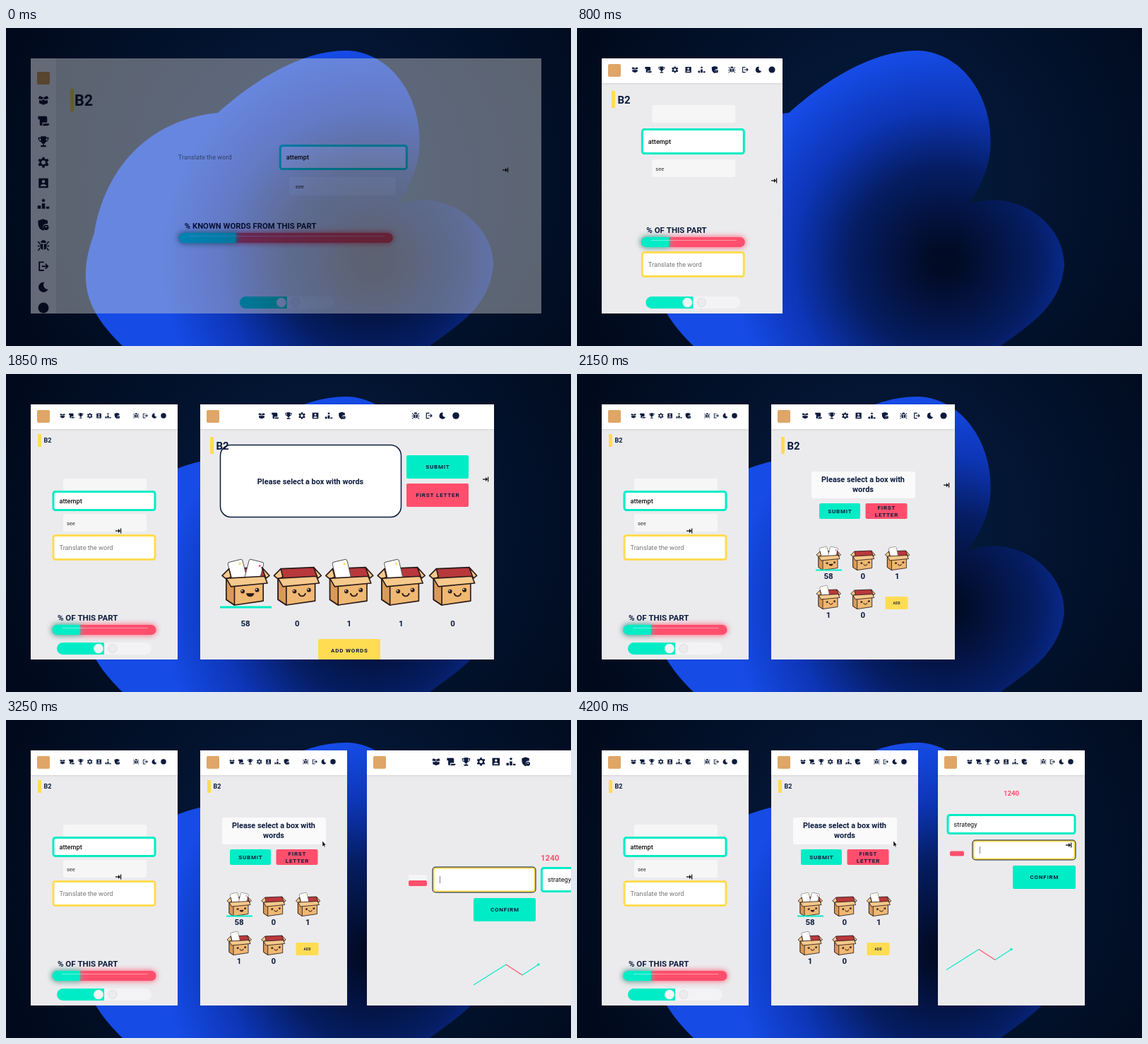
Write an HTML page with a canvas that moves like this. It is 800 px wide and 450 px high and loops after 4.25 s.

```html
<!DOCTYPE html>
<html lang="en">
<head>
<meta charset="utf-8">
<title>Responsive windows</title>
<style>
html, body { margin: 0; width: 100%; height: 100%; overflow: hidden; background: #010c22; }
canvas { display: block; }
</style>
</head>
<body>
<canvas width="800" height="450"></canvas>
<script>
// Each window is painted on the layer (g), then laid onto the stage
const stage = document.querySelector('canvas').getContext('2d');
const layer = new OffscreenCanvas(800, 450);
const g = layer.getContext('2d');
const LOOP = 4250, STEP = 50, TOP = 43, BOTTOM = 404, SIDEBAR = 36;
const NAVY = '#0c1b3d', TEAL = '#00ecc6', RED = '#ff4f6d', YELLOW = '#ffdc52', PAGE = '#ebebed';

// Piecewise linear value through [position, value] points
function along(p, points) {
  if (p <= points[0][0]) return points[0][1];
  for (let i = 1; i < points.length; i++) {
    const [a, u] = points[i - 1], [b, v] = points[i];
    if (p <= b) return u + (v - u) * (p - a) / (b - a);
  }
  return points[points.length - 1][1];
}

function text(s, x, y, size, { weight = 700, color = NAVY, align = 'left', spacing = 0 } = {}) {
  g.font = `${weight} ${size}px Roboto, Arial, sans-serif`;
  g.letterSpacing = spacing + 'px';
  g.textAlign = align;
  g.textBaseline = 'alphabetic';
  g.fillStyle = color;
  g.fillText(s, x + (align === 'center' ? spacing / 2 : 0), y + size * .36);
}

function rect(x, y, w, h, r, fill, line, width = 1.5) {
  g.beginPath();
  g.roundRect(x, y, w, h, r);
  if (fill) { g.fillStyle = fill; g.fill(); }
  if (line) { g.strokeStyle = line; g.lineWidth = width; g.stroke(); }
}

function dot(x, y, r, fill, line) {
  g.beginPath();
  g.arc(x, y, r, 0, 7);
  g.fillStyle = fill;
  g.fill();
  if (line) { g.strokeStyle = line; g.lineWidth = 1; g.stroke(); }
}

function poly(points, fill, line, width = 1.7) {
  g.beginPath();
  points.forEach(([x, y]) => g.lineTo(x, y));
  if (fill) { g.closePath(); g.fillStyle = fill; g.fill(); }
  if (line) { g.strokeStyle = line; g.lineWidth = width; g.lineJoin = 'round'; g.stroke(); }
}

function glow(color, blur, draw) {
  g.save();
  g.shadowColor = color;
  g.shadowBlur = blur;
  draw();
  g.restore();
}

function field(x, y, w, h, color, s, style) {
  rect(x + 1.5, y + 1.5, w - 3, h - 3, 3, '#fff', color, 3);
  text(s, x + 10, y + h / 2, 9.2, style);
}

function focusField(x, y, w, h) {
  rect(x - .5, y - .5, w + 1, h + 1, 5, NAVY);
  rect(x + 1.5, y + 1.5, w - 3, h - 3, 3, '#fff', YELLOW, 2);
  rect(x + 10, y + h / 2 - 5, .8, 10, 0, '#666');
}

function button(s, x, y, w, h, color) {
  rect(x, y, w, h, 2, color);
  const lines = s.split('\n');
  lines.forEach((line, i) => text(line, x + w / 2, y + h / 2 + (i - (lines.length - 1) / 2) * 9.5, 8,
    { weight: 600, align: 'center', spacing: .8 }));
}

const icons = [
  'M2 9l3-5 7 3 7-3 3 5-7 2-3-3-3 3zM4 12l5 1 3-3 3 3 5-1v6l-8 3-8-3z',
  'M2 3h14q3 0 3 3v9h-9v3q0 3-3 3-2 0-2-3V9H2zM12 17h11q0 4-4 4H9q3-1 3-4z',
  'M7 2h10v2h5q0 8-6 9-1 3-3 3v3h4v3H7v-3h4v-3q-2 0-3-3-6-1-6-9h5zM4 6q0 4 3 5V6zM17 6v5q3-1 3-5z',
  'M10 2h4l.5 3 2.5 1 3-1 2 3.5-2.5 2v3l2.5 2-2 3.5-3-1-2.5 1-.5 3h-4l-.5-3-2.5-1-3 1-2-3.5 2.5-2v-3l-2.5-2 2-3.5 3 1 2.5-1zM12 8a4 4 0 100 8 4 4 0 000-8z',
  'M3 3h18v18H3zM12 6a3 3 0 100 6 3 3 0 000-6zM6 18h12q-1-4-6-4t-6 4z',
  'M1 15h6v6H1zM9 11h6v10H9zM17 17h6v4h-6zM12 1l1.2 2.6 2.8.3-2 2 .5 2.8-2.5-1.4-2.5 1.4.5-2.8-2-2 2.8-.3z',
  'M11 1l9 3v6h-3a6 6 0 00-3 11l-3 2q-9-4-9-13V4zM17 12a5 5 0 100 10 5 5 0 000-10zM17 14a1.5 1.5 0 100 3 1.5 1.5 0 000-3z',
  'M7 7a5 5 0 0110 0zM6 9h5v11a6 6 0 01-5-6zM13 9h5v5a6 6 0 01-5 6zM1 12h4v2H1zM19 12h4v2h-4zM3 4l3 4-1 2-4-5zM21 4l-3 4 1 2 4-5zM5 16l1 2-3 4-2-1zM19 16l-1 2 3 4 2-1z',
  'M3 3h10v2.5H5.5v13H13V21H3zM9 10.7h8.5L15 8l1.6-1.6L22 12l-5.4 5.6L15 16l2.5-2.7H9z',
  'M14 3a9.5 9.5 0 107 13 8 8 0 01-7-13z',
  'M12 2a10 10 0 100 20 10 10 0 000-20z'
].map(d => new Path2D(d));

function icon(i, x, y, size) {
  g.save();
  g.translate(x - size / 2, y - size / 2);
  g.scale(size / 24, size / 24);
  g.fillStyle = NAVY;
  g.fill(icons[i], 'evenodd');
  g.restore();
}

function nav(left, w, side) {
  if (side) {
    rect(left, TOP, SIDEBAR, BOTTOM - TOP, 0, '#fff');
    icons.forEach((_, i) => icon(i, left + 18, 102 + i * 29.4, 18));
  } else {
    glow('rgba(0,0,0,.2)', 3, () => rect(left, TOP, w, 35, 0, '#fff'));
    const size = along(w, [[208, 9], [256, 11], [416, 11.5], [502, 14]]);
    const gap = along(w, [[208, 12.9], [256, 18.9], [416, 19], [502, 21.2]]);
    const first = along(w, [[208, 45], [256, 47], [416, 87], [502, 98], [570, 98], [650, 44]]);
    const last = along(w, [[208, 188], [256, 241], [416, 362], [502, 448], [570, 500], [650, 252]]);
    icons.forEach((_, i) => icon(i, left + (i < 7 ? first + i * gap : last - (10 - i) * gap), 59, size));
  }
  rect(left + 9, side ? 62 : 51, 18, 18, 2, '#dfa667');
}

function heading(left, w, side) {
  if (side) {
    rect(left + 56, 86, 5, 32, 0, YELLOW);
    text('B2', left + 62, 102, 21.5);
  } else if (w < 230) {
    rect(left + 10, 85, 5, 18, 0, YELLOW);
    text('B2', left + 18.5, 94, 9);
  } else {
    rect(left + 14, 89, 5, 24, 0, YELLOW);
    text('B2', left + 22.5, 101.5, 15);
  }
}

function progress(x, y, w) {
  const part = w * .267;
  glow(RED, 9, () => rect(x, y, w, 14, 7, RED));
  glow(TEAL, 9, () => rect(x, y, part, 14, [7, 0, 0, 7], TEAL));
  rect(x + 14, y + 4, w - 26, .7, 0, 'rgba(255,255,255,.55)');
}

function toggle(c) {
  rect(c - 67, 380, 134, 17, 8.5, '#f3f3f5');
  rect(c - 67, 380, 67, 17, [8.5, 0, 0, 8.5], TEAL);
  dot(c - 8, 388.5, 6.5, '#f4f4f4', '#d8f5ee');
  dot(c + 12, 388.5, 6, '#ececee', '#dcdcde');
}

function wordPage(left, w, side) {
  const narrow = w < 230, c = left + w / 2 + (narrow ? 0 : 1.3);
  const hint = { weight: 400, color: '#777' }, word = { weight: 500, color: '#111' };
  const small = { weight: 400, color: '#333' };
  const option = (x, y, s) => {
    rect(x, y, 118, 25, 3, '#f6f6f7');
    text(s, x + 5, y + 13, 7.5, small);
  };
  if (w > 400) {
    text('Translate the word', c - 154, 183, 9.2, hint);
    rect(c + 3, 211, 151, 26, 3, '#f6f6f7');
    text('see', c + 12, 224, 7.5, small);
    field(c - 11, 165, 182, 36, TEAL, 'attempt', word);
    text('% KNOWN WORDS FROM THIS PART', c - 145, 280, 11.3);
    progress(c - 153, 290, 303);
  } else {
    const [top, mid, low, ask, title, bar] = narrow
      ? [148, 165, 198, 227, 345, 355] : [109, 142, 186, 316, 286, 296];
    option(c - 58, top, '');
    option(c - 58, low, 'see');
    field(c - 73.5, mid, 147, narrow ? 29 : 37, TEAL, 'attempt', word);
    text('% OF THIS PART', c - 66, title, 11.5);
    progress(c - 73.5, bar, 147);
    field(c - 73.5, ask, 147, 37, YELLOW, 'Translate the word', hint);
  }
  toggle(c);
  heading(left, w, side);
}

function carton(x, y, scale, cards, laughing) {
  const ink = '#2a1a18', tan = '#efb873', pale = '#f6c98c';
  g.save();
  g.translate(x, y);
  g.scale(scale, scale);
  poly([[-24, -20], [24, -22], [31, -7], [-27, -4]], '#b8383c', ink);
  for (let i = 0; i < cards; i++) {
    g.save();
    g.translate(cards > 1 ? -12 + i * 25 : -11, -18);
    g.rotate(cards > 1 ? -.25 + i * .5 : -.22);
    rect(-11, -14, 22, 28, 3, '#fff', '#555', 1);
    dot(6, -8, 1.6, i ? RED : YELLOW);
    g.restore();
  }
  poly([[-28, -5], [-17, 0], [26, -2], [26, 27], [-16, 33], [-28, 25]], tan, ink);
  poly([[-28, -5], [-16, 1], [-16, 33], [-28, 25]], '#d99a59', ink);
  poly([[-24, -20], [-34, -10], [-28, -5], [-21, -8]], pale, ink);
  poly([[-28, -6], [28, -9], [32, 1], [-21, 6]], pale, ink);
  poly([[24, -22], [35, -10], [30, -6]], pale, ink);
  dot(-4, 13, 3, ink);
  dot(17, 11, 3, ink);
  dot(-5, 12, 1, '#fff');
  dot(16, 10, 1, '#fff');
  g.beginPath();
  g.arc(7, 15, laughing ? 6 : 5, .1, 3);
  g.strokeStyle = g.fillStyle = ink;
  g.lineWidth = 2;
  laughing ? g.fill() : g.stroke();
  g.restore();
}

function verticalBar(x, label) {
  glow(RED, 9, () => rect(x, 152, 14, 186, 7, RED));
  rect(x + 5, 164, .7, 160, 0, 'rgba(255,255,255,.55)');
  g.save();
  g.translate(x + 24, 270);
  g.rotate(Math.PI / 2);
  text(label, 0, 0, 10.7, { align: 'center' });
  g.restore();
}

function boxPage(left, w, side) {
  const c = left + w / 2, mid = { align: 'center' };
  const counts = [58, 0, 1, 1, 0], cards = [2, 0, 1, 1, 0];
  if (w > 300) {
    const bars = w > 600, x = c - (bars ? 237 : 180);
    rect(x + .5, 100.5, 256, 102, 15, '#fff', NAVY);
    text('Please select a box with words', x + 128, 152, 10.9, mid);
    button('SUBMIT', x + 264, 115, 88, 33, TEAL);
    button('FIRST LETTER', x + 264, 155, 88, 33, RED);
    counts.forEach((n, i) => {
      const bx = x + 36 + i * 73.4;
      carton(bx, 295, .97, cards[i], !i);
      text(n, bx, 353, 11.5, mid);
    });
    rect(x, 328.5, 73, 3, 0, TEAL);
    button('ADD WORDS', x + 139, 375, 88, 33, YELLOW);
    if (bars) {
      verticalBar(x + 385, 'DAILY PROGRESS');
      verticalBar(x + 430, 'TOTAL PROGRESS');
    }
  } else {
    rect(c - 73, 138, 147, 38, 3, '#fafafb');
    text('Please select a box with', c, 149.5, 10.9, mid);
    text('words', c, 163.5, 10.9, mid);
    button('SUBMIT', c - 62, 183, 58, 22, TEAL);
    button('FIRST\nLETTER', c + 3.5, 183, 59, 22, RED);
    counts.forEach((n, i) => {
      const bx = c - 49 + i % 3 * 48.7, y = i < 3 ? 261 : 316;
      carton(bx, y, .5, cards[i], !i);
      text(n, bx, y + 24.5, 11.5, mid);
    });
    rect(c - 67, 276.5, 37, 2, 0, TEAL);
    rect(c + 31.5, 315, 32, 18, 2, YELLOW);
    text('ADD', c + 47.5, 324, 4.5, { align: 'center', spacing: .5 });
  }
  heading(left, w, side);
}

function chart(x, y) {
  const points = [[x, y], [x + 46, y - 29], [x + 69, y - 14], [x + 92, y - 29]];
  [TEAL, RED, TEAL].forEach((color, i) => poly(points.slice(i, i + 2), null, color, 1.1));
  dot(x + 92, y - 29, 1.7, TEAL);
}

function scorePage(left, w, side) {
  const c = left + (w + (side ? SIDEBAR : 0)) / 2, word = { weight: 400, color: '#111' };
  if (w > 300) {
    rect(c - 192, 219, 26, 16, 2, '#f5f5f6');
    rect(c - 192, side ? 224 : 227, 26, 8, 2, RED);
    focusField(c - 158, 208, 146, 36);
    text('1240', c - 5, 195, 11.5, { color: RED });
    field(c - 5, 208, 146, 36, TEAL, 'strategy', word);
    button('CONFIRM', c - 100, 252, 88, 33, TEAL);
    chart(c - 100, 375);
  } else {
    text('1240', c, 104, 9.7, { color: RED, align: 'center' });
    field(c - 91.5, 133, 183, 29, TEAL, 'strategy', word);
    rect(c - 87, 185.5, 20, 7, 2, RED);
    focusField(c - 55, 170, 146, 28);
    button('CONFIRM', c + 2, 206, 89, 33, TEAL);
    chart(c - 92, 353.5);
  }
}

function resizeCursor(x, y) {
  poly([[x - 4, y], [x + 2, y]], null, '#111', 1.3);
  poly([[x, y - 3], [x + 3, y], [x, y + 3]], '#111');
  rect(x + 3, y - 3.5, 1.2, 7, 0, '#111');
}

function arrowCursor(x, y) {
  poly([[x, y], [x, y + 8], [x + 1.7, y + 6.5], [x + 3, y + 9], [x + 4, y + 8.5], [x + 3, y + 6], [x + 5, y + 6]], '#111', '#fff', .4);
}

// right: window edge over time; mouse: cursor offset from that edge and its height
const windows = [
  { left: 35, open: 0, page: wordPage, right: [[100, 758], [800, 291], [960, 243]],
    mouseX: [[0, -51], [100, -12], [960, -12], [1350, -78], [1850, -84]],
    mouseY: [[0, 201], [800, 216], [1350, 222]] },
  { left: 275, open: 1100, page: boxPage, right: [[1230, 998], [1350, 940], [1850, 691], [2250, 483]],
    mouseX: [[2250, -12], [2450, -38], [3000, -35]],
    mouseY: [[1850, 149], [2250, 160], [2450, 171], [3000, 171]], arrowFrom: 3000 },
  { left: 511, open: 2250, page: scorePage, right: [[2500, 1234], [3250, 1013], [3900, 719]],
    mouseX: [[3900, -12], [4150, -23]], mouseY: [[3900, 177]] }
];

function drawWindow(win, t) {
  if (t < win.open) return;
  const { left } = win, right = along(t, win.right), w = right - left, side = w > 670;
  g.clearRect(0, 0, 800, 450);
  g.save();
  g.beginPath();
  g.rect(left, TOP, w, BOTTOM - TOP);
  g.clip();
  rect(left, TOP, w, BOTTOM - TOP, 0, PAGE);
  nav(left, w, side);
  win.page(left, w, side);
  const x = right + along(t, win.mouseX), y = along(t, win.mouseY);
  t >= win.arrowFrom ? arrowCursor(x, y) : resizeCursor(x, y);
  g.restore();

  // A white veil thickens while the page is multiplied onto it
  stage.globalAlpha = Math.min(1, .39 + (t - win.open) / 250);
  stage.fillStyle = '#fff';
  stage.fillRect(left, TOP, w, BOTTOM - TOP);
  stage.globalAlpha = 1;
  stage.globalCompositeOperation = 'multiply';
  stage.drawImage(layer, 0, 0);
  stage.globalCompositeOperation = 'source-over';
}

function radial(x, y, inner, outer, stops) {
  const fill = stage.createRadialGradient(x, y, inner, x, y, outer);
  stops.forEach(([at, color]) => fill.addColorStop(at, color));
  return fill;
}
const sky = radial(440, 215, 60, 460, [[0, '#041b3d'], [1, '#010a1d']]);
const blue = radial(520, 330, 20, 300, [[0, '#020b26'], [.4, '#051d62'], [.7, '#0d36b8'], [1, '#164be6']]);
const backdrop = new Path2D('M300 120C350 75 420 30 485 32C550 36 592 105 585 175C580 215 560 240 552 250' +
  'C620 225 690 275 690 335C685 395 640 420 600 450H165C125 410 95 370 125 290C140 200 200 130 300 120Z');

function draw(now) {
  const t = Math.floor(now % LOOP / STEP) * STEP;
  stage.fillStyle = sky;
  stage.fillRect(0, 0, 800, 450);
  stage.fillStyle = blue;
  stage.fill(backdrop);
  windows.forEach(win => drawWindow(win, t));
  requestAnimationFrame(() => draw(performance.now() - start));
}
const start = performance.now();
draw(0);
</script>
</body>
</html>
```
